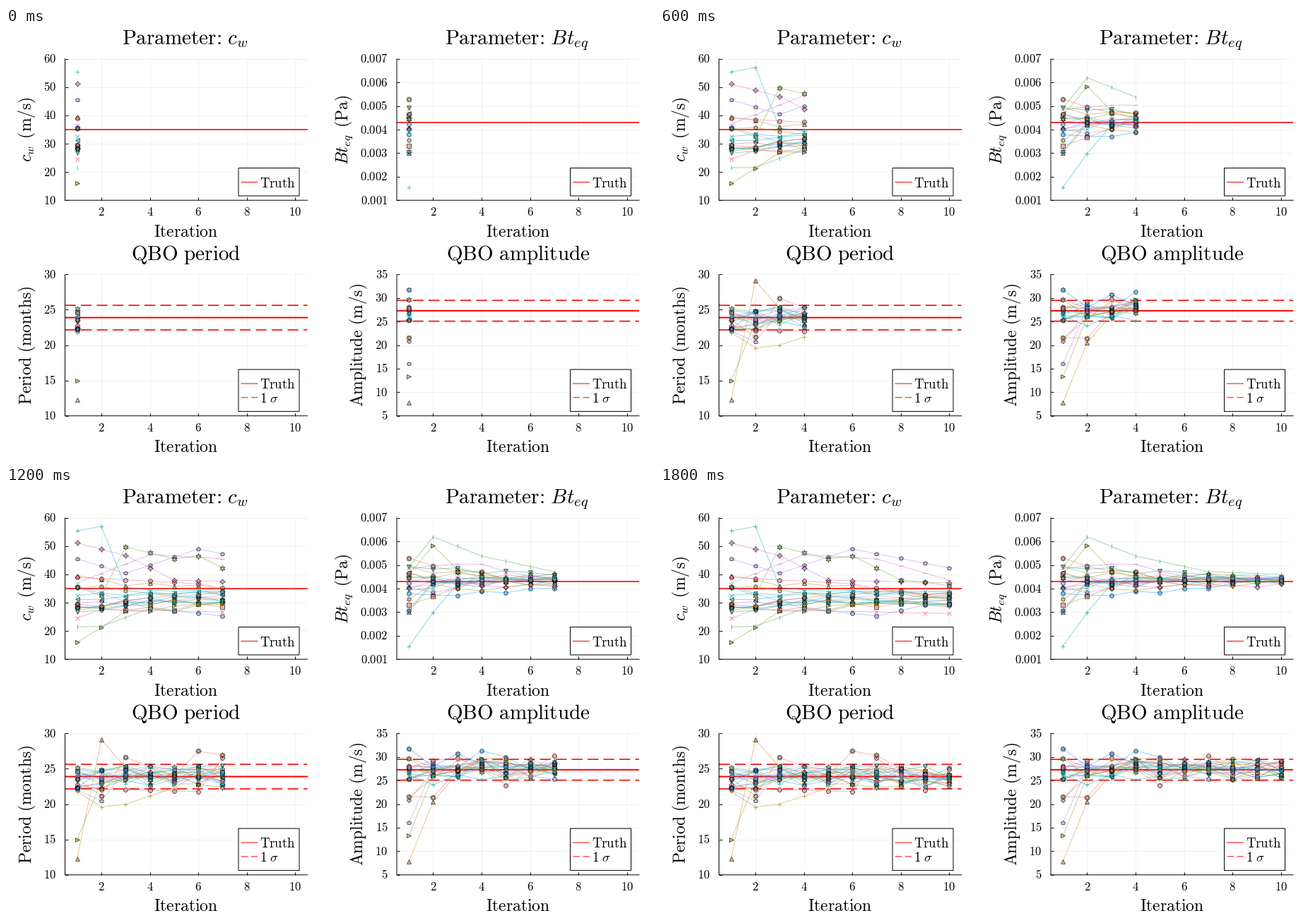
Write a matplotlib script that moves like this. It is 917 px wide and 611 px high and loops after 2800 ms.

```python
import numpy as np
import matplotlib.pyplot as plt
from matplotlib.animation import FuncAnimation
from matplotlib.colors import to_rgba
from matplotlib.patches import Rectangle

plt.rcParams["mathtext.fontset"] = "cm"

W, H, DPI = 917, 611, 100
PX = 72 / DPI
ITERATIONS, FRAMES, INTERVAL = 10, 14, 200
TICK, LEGEND, GUIDE, TITLE = 12, 13.5, 17, 21

PALETTE = ["#009afa", "#e36f47", "#3ea44e", "#c371d2", "#ac8e18", "#00aaae",
           "#ed5e93", "#c68225", "#00a98d", "#8e971e", "#00a9cc", "#9b7fe9",
           "#618df6", "#f06073", "#dd65b6", "#6c9f33"]

# Order fixes the colour of each member.
MARKERS = {
    "circle": "o", "rect": "s", "star5": (5, 1, 0), "diamond": "D",
    "hexagon": "h", "cross": "+", "xcross": "x", "up": "^", "down": "v",
    "right": ">", "left": "<", "pentagon": "p", "heptagon": (7, 0, 0),
    "octagon": "8", "star4": (4, 1, 0), "star6": (6, 1, 0),
    "star7": (7, 1, 0), "star8": (8, 1, 0), "vline": "|", "hline": "_",
    "plus": "+", "times": "x",
}

# Key points {iteration: value} of the members that stand out.
WIND = {
    "cross": {1: 55.4, 2: 57, 3: 35.5}, "star4": {1: 51.1, 3: 46.7, 5: 38, 10: 37},
    "star6": {2: 32.4, 3: 49.8, 5: 45.5, 6: 46.6, 8: 38},
    "pentagon": {1: 45.5, 3: 40.4, 6: 49, 10: 42.3}, "hline": {1: 37, 4: 47, 7: 45.5, 10: 38},
    "heptagon": {1: 35.8, 4: 28, 7: 25.3, 9: 29.2}, "octagon": {1: 39, 6: 36.7},
    "vline": {1: 21.5, 2: 21.6, 4: 28}, "right": {1: 16, 2: 21.2, 3: 27},
    "xcross": {1: 24.5, 2: 27.6, 10: 26.2}, "rect": {1: 28.7, 3: 27.2},
}
HEATING = {
    "cross": {1: 1.55, 2: 2.98, 3: 4.2}, "vline": {1: 4.9, 2: 6.2, 4: 5.38, 7: 4.72, 10: 4.6},
    "right": {1: 4.58, 2: 5.83, 3: 4.8}, "star8": {1: 5.3, 2: 4.95}, "rect": {1: 3.3},
    "up": {1: 3.02, 2: 4.2}, "hexagon": {1: 3.55, 2: 4.2}, "star7": {1: 3.08, 2: 4.3},
}
PERIOD = {
    "up": {1: 12.3, 2: 29.1, 3: 25.2}, "right": {1: 15, 2: 23.2},
    "plus": {1: 21.8, 2: 19.6, 3: 20, 5: 22.3}, "pentagon": {1: 22, 2: 20.5},
    "star8": {2: 21.2, 3: 26.6, 5: 24, 6: 27.5, 7: 26.9},
    "octagon": {2: 22.1, 6: 21.8, 7: 26.5, 9: 22},
}
AMPLITUDE = {
    "up": {1: 7.8, 2: 20.5, 3: 26.5}, "right": {1: 13.3, 2: 26}, "star7": {1: 31.8, 2: 28, 3: 30.7},
    "pentagon": {1: 16.1, 2: 27.6}, "diamond": {1: 20.8, 2: 27}, "plus": {1: 21.4, 2: 25.6},
    "star8": {1: 21.6, 2: 21.5, 3: 27.2}, "circle": {3: 27.8, 4: 31.3},
    "octagon": {4: 27.4, 5: 24, 7: 30.3}, "cross": {1: 26.2, 2: 24.1},
}


def ensemble(known, mean, spread, keep, noise, decay, seed):
    """Members pass through their key points; elsewhere they drift to the mean."""
    rng = np.random.default_rng(seed)
    paths = {}
    for name in MARKERS:
        keys = known.get(name, {})
        xs, ys = list(keys), list(keys.values())
        steps = np.clip(rng.normal(size=ITERATIONS), -1.6, 1.6)
        value = mean + spread * steps[0]
        path = []
        for n in range(1, ITERATIONS + 1):
            if xs and xs[0] <= n <= xs[-1]:
                value = np.interp(n, xs, ys)
            elif n > 1:
                value = mean + keep * (value - mean) + noise * decay**n * steps[n - 1]
            path.append(value)
        paths[name] = path
    return paths


fig = plt.figure(figsize=(W / DPI, H / DPI), dpi=DPI, facecolor="white")
stage = fig.add_axes([0, 0, 1, 1], zorder=5)
stage.set(xlim=(0, W), ylim=(H, 0))
stage.axis("off")


def label(x, y, tex, size, ha="center", rotation=0):
    stage.text(x, y, f"${tex}$", size=size, ha=ha, va="baseline",
               rotation=rotation, rotation_mode="anchor")


def dashes(on, off, width):
    return (0, (on / width, off / width))


def legend(x, y, height, entries):
    stage.add_patch(Rectangle((x, y), 86, height, fc="white", ec="black",
                              lw=PX, snap=False))
    for i, (tex, style) in enumerate(entries):
        row = y + 20 + 19.7 * i
        stage.plot([x + 4, x + 27], [row, row], color="red", lw=PX, ls=style,
                   dash_capstyle="butt", snap=False)
        label(x + 30.3, row + 7, tex, LEGEND, ha="left")


def marker_size(marker):
    if isinstance(marker, tuple):
        return 8 if marker[1] else 6.2
    return {"D": 4.4, "s": 5.4, "+": 6.5}.get(marker, 5.8)


def draw_member(ax, index, marker):
    color = PALETTE[index % len(PALETTE)]
    stroke = isinstance(marker, str) and marker in "+x|_"
    edge = to_rgba(color, 0.7) if stroke else to_rgba("black", 0.6)
    line, = ax.plot([], [], color=to_rgba(color, 0.5), lw=0.9 * PX, marker=marker,
                    ms=marker_size(marker) * PX, mfc=to_rgba(color, 0.5),
                    mec=edge, mew=PX, zorder=3)
    return line


def panel(left, top, limits, ticks, tick_format, title, title_x, ylabel, ylabel_x,
          truth, sigma, paths):
    width, height = 343, 200.4
    bottom = top + height
    ax = fig.add_axes([left / W, 1 - bottom / H, width / W, height / H])
    ax.set(xlim=(0.5, 10.5), ylim=limits, xticks=range(2, 11, 2), yticks=ticks)
    ax.patch.set_visible(False)
    ax.spines[["top", "right"]].set_visible(False)
    for side in ("left", "bottom"):
        ax.spines[side].set(linewidth=PX, snap=False)
    ax.tick_params(direction="in", length=4 * PX, width=PX,
                   labelleft=False, labelbottom=False)
    ax.grid(color="black", alpha=0.1, lw=0.5 * PX)
    ax.set_axisbelow(True)

    for tick in range(2, 11, 2):
        label(left + (tick - 0.5) * width / 10, bottom + 22.2, tick, TICK)
    low, high = limits
    for tick in ticks:
        y = bottom - (tick - low) / (high - low) * height
        label(left - 12.6, y + 5.5, rf"\mathrm{{{tick_format(tick)}}}", TICK, ha="right")
    label(title_x, top - 20.5, title, TITLE)
    label(left + width / 2, bottom + 51.5, r"\mathrm{Iteration}", GUIDE)
    label(ylabel_x, top + height / 2, ylabel, GUIDE, rotation=90)

    ax.axhline(truth, color="red", lw=(2 if sigma else 1.6) * PX, snap=False)
    entries = [(r"\mathrm{Truth}", "-")]
    if sigma:
        for value in (truth - sigma, truth + sigma):
            ax.axhline(value, color="red", lw=1.6 * PX, ls=dashes(15.3, 7.2, 1.6 * PX / PX),
                       dash_capstyle="butt", snap=False)
        entries.append((r"1\ \sigma", dashes(9.5, 4.5, 1)))
    box = 20 * len(entries) + 19.5
    legend(left + 245.5, bottom - 6.2 - box, box, entries)

    return [(draw_member(ax, i, marker), paths[name])
            for i, (name, marker) in enumerate(MARKERS.items())]


PARAMETER = r"\mathrm{Parameter}\hspace{-0.2}:\hspace{0.133}"
GAP = r"\hspace{0.5}"
LEFT, RIGHT, UPPER, LOWER = 83.5, 553, 43.8, 349.4

tracks = (
    panel(LEFT, UPPER, (10, 60), range(10, 61, 10), str,
          PARAMETER + "c_w", 253.2, "c_w" + GAP + r"\mathrm{(m/s)}", 36, 35, 0,
          ensemble(WIND, 31.6, 5, 0.85, 1.3, 0.95, 4))
    + panel(RIGHT, UPPER, (1, 7), range(1, 8), lambda t: f"{t / 1000:.3f}",
            PARAMETER + "Bt_{eq}", 722.3, "Bt_{eq}" + GAP + r"\mathrm{(Pa)}", 484, 4.3, 0,
            ensemble(HEATING, 4.36, 0.36, 0.65, 0.25, 0.89, 8))
    + panel(LEFT, LOWER, (10, 30), range(10, 31, 5), str,
            r"\mathrm{QBO\ period}", 255, r"\mathrm{Period\ (months)}", 36, 23.9, 1.74,
            ensemble(PERIOD, 23.9, 1, 0.15, 0.9, 0.99, 15))
    + panel(RIGHT, LOWER, (5, 35), range(5, 36, 5), str,
            r"\mathrm{QBO\ amplitude}", 724.5, r"\mathrm{Amplitude\ (m/s)}", 505,
            27.3, 2.21, ensemble(AMPLITUDE, 27.5, 1.4, 0.1, 1.4, 0.99, 16))
)


def update(frame):
    count = min(frame + 1, ITERATIONS)
    for line, path in tracks:
        line.set_data(np.arange(1, count + 1), path[:count])
    return [line for line, _ in tracks]


animation = FuncAnimation(fig, update, frames=FRAMES, interval=INTERVAL, repeat=True)
plt.show()
```
